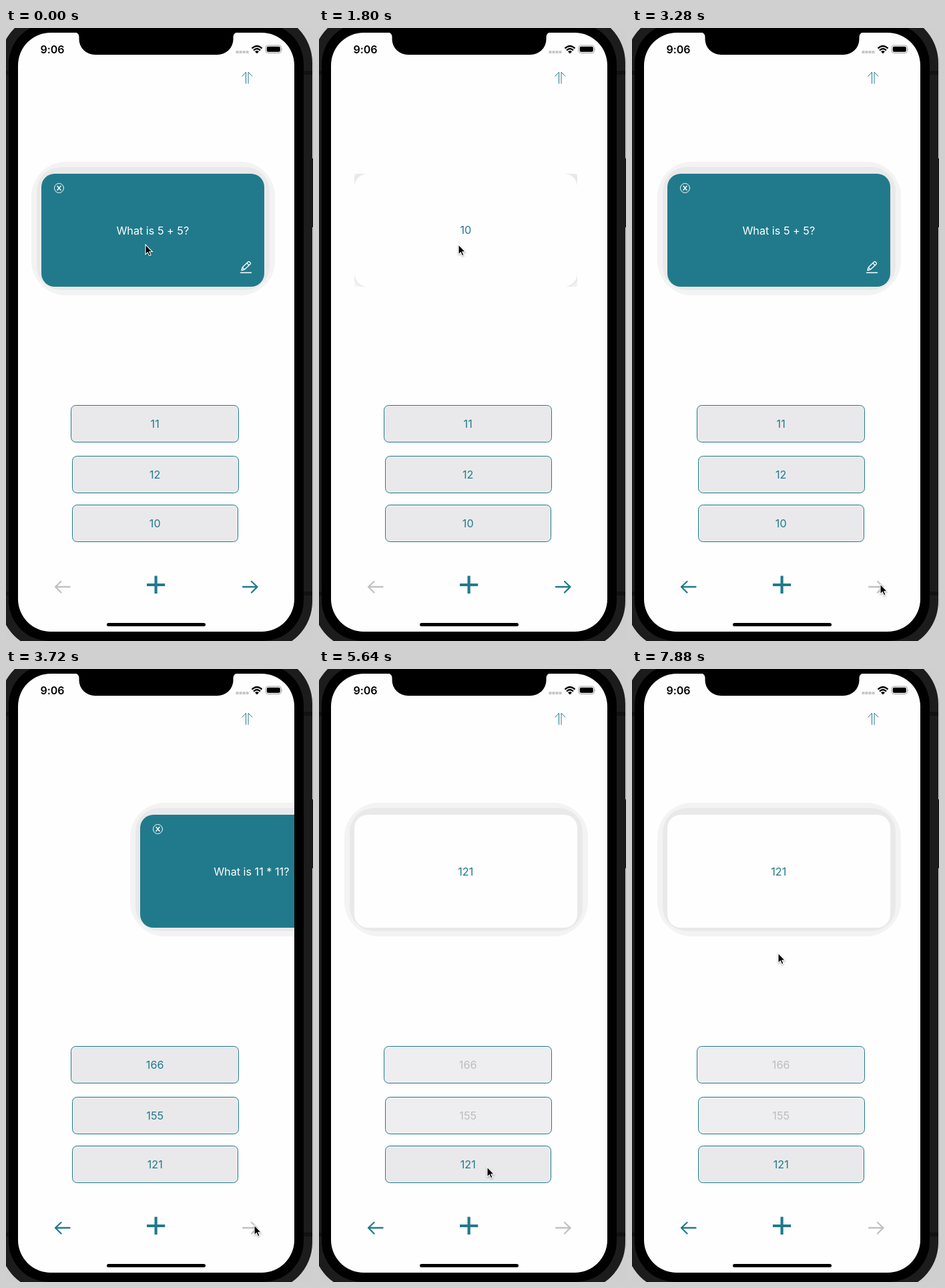
Recreate the animation shown at these times as an HTML page. Size 460x917 px, loop 8000 ms.

```html
<!DOCTYPE html>
<html lang="en">
<head>
<meta charset="utf-8">
<title>Flashcards</title>
<style>
  html, body { margin: 0; width: 100%; height: 100%; overflow: hidden; background: #cfcfcf; }
  #stage { position: fixed; inset: 0; overflow: hidden; contain: strict; }
  #window { position: absolute; left: 18px; top: 0; width: 414px; height: 100%; overflow: hidden; }
  svg { position: absolute; left: 0; top: 0; width: 100%; height: 100%; display: block; }
  #card { left: 35px; top: 218px; width: 334px; height: 169px; overflow: visible; }
  text {
    font-family: Inter, "Liberation Sans", sans-serif;
    font-size: 16.2px; font-feature-settings: "calt" 0; text-anchor: middle;
  }
  .line { fill: none; stroke-linecap: round; stroke-linejoin: round; }
</style>
</head>
<body>
<div id="stage">
<svg viewBox="0 0 460 917">
  <rect width="460" height="917" fill="#cfcfcf"/>
  <rect x="458" y="195" width="2" height="103" fill="#111"/>
  <rect x="-9" y="-20" width="468" height="950" rx="72" fill="#1c1c1c"/>
  <path d="M0 64h4v6h-4zM446 64h13v6h-13zM0 843h4v6h-4zM446 843h13v6h-13z" fill="#121212"/>
  <rect x="4" y="-7" width="442" height="924" rx="61"/>
  <rect x="18" y="7" width="414" height="896" rx="49" fill="#fefefe"/>
  <path d="M103 6.5Q109 7 109.500 13V17A24 23 0 0 0 133.500 40H316.500A24 23 0 0 0 340.500 17V13Q341 7 347 6.500Z"/>

  <text x="69.500" y="37.500" font-weight="600" style="font-size:16px">9:06</text>
  <path d="M344.500 34h4v4h-4zM349.500 34h4v4h-4zM354.500 34h4v4h-4zM359.500 34h4v4h-4z" fill="#c6c6c8"/>
  <path d="M368.500 30.500Q376 23.500 383.500 30.500M371 33.300Q376 28.700 381 33.300" fill="none" stroke="#000" stroke-width="2.300"/>
  <path d="M373 35.300Q376 32.600 379 35.300L376 38.300Z"/>
  <rect x="389" y="26" width="23.500" height="11.500" rx="3.500" fill="none" stroke="#a2a2a2"/>
  <rect x="390.700" y="27.700" width="20.100" height="8.100" rx="2"/>
  <path d="M413.700 30v4q1.600-2 0-4z" fill="#a2a2a2"/>
  <path class="line" d="M359.500 83V66L354 72M363 83V66L368.800 72" stroke="#217a8b"/>

  <g id="answers"></g>
  <path class="line" id="prev" d="M95.500 836H74M82.500 828L74 836L82.500 844.500" stroke-width="2.300"/>
  <path class="line" id="next" d="M355 836H376.500M368 828L376.500 836L368 844.500" stroke-width="2.300"/>
  <path d="M211 833H238.200M224.600 819.500V846" stroke="#217a8b" stroke-width="4.200"/>
  <rect x="151" y="890" width="148" height="5" rx="2.500"/>
</svg>

<div id="window">
  <svg id="card" viewBox="53 218 334 169">
    <rect x="38" y="200" width="365" height="200" rx="52" fill="#f3f3f3"/>
    <rect x="46" y="208" width="349" height="184" rx="36" fill="#e9e9ea"/>
    <rect id="face" x="53" y="218" width="334" height="169" rx="20"/>
    <text id="label" x="219.800" y="308.500"></text>
    <g id="tools" class="line" stroke="#fff">
      <circle cx="79.500" cy="239.500" r="7"/>
      <path d="M77 236.500L82 242.500M82 236.500L77 242.500" stroke-width="1.500"/>
      <path d="M351.500 366H367.500" stroke-width="1.400"/>
      <path d="M353 362.500L354.200 358L362.800 349.800Q364 349 365.200 350.200L366 351Q367 352.200 366 353.300L357.500 361.300ZM361 351.700L364.200 355M354.200 358L357.500 361.300" stroke-width="1.300"/>
    </g>
  </svg>
</div>

<svg viewBox="0 0 460 917">
  <path id="cursor" d="M0 0V14.800L3.300 11.700L5.600 16.800L8.100 15.700L5.900 10.800H10.500Z" stroke="#fff" stroke-width="1.100" style="filter:drop-shadow(0 1px 1px #0005)"/>
</svg>
</div>

<script>
const LOOP = 8000;
const STEP = 148.4;     // time between redraws
const TURN = 300;       // length of each card transition
const SLIDE = 300;      // distance the card travels
const NEXT = 3259, SWAP = NEXT + TURN;
const PRESS = 5190, ANSWER = 5330;
const TEAL = '#217a8b', GREY = '#c1c1c1';

const flips = [430, 1780, ANSWER];

// Each pointer move is a curve bent towards one control point.
const moves = [
  { start: 2200, end: 2900, from: [209, 324], bend: [425, 745], to: [372, 832] },
  { start: 4200, end: 5050, from: [372, 832], bend: [312, 790], to: [252, 745] },
  { start: 7000, end: 7860, from: [252, 745], bend: [310, 590], to: [219, 425] }
];

const $ = id => document.getElementById(id);
const clamp = v => Math.min(1, Math.max(0, v));
const ease = v => { v = clamp(v); return v * v * (3 - 2 * v); };

function put(node, attrs) {
  for (const key in attrs) node.setAttribute(key, attrs[key]);
  return node;
}

function make(tag, attrs) {
  const node = document.createElementNS('http://www.w3.org/2000/svg', tag);
  return $('answers').appendChild(put(node, attrs));
}

const buttons = [[97, 564, 349], [99, 640, 349], [99, 713, 348]].map(([left, top, right]) => ({
  box: make('rect', {
    x: left + .5, y: top + .5, width: right - left - 1, height: 55, rx: 7, stroke: TEAL
  }),
  text: make('text', { x: 223.2, y: top + 33.7 })
}));

function pointer(t) {
  const { start, end, from, bend, to } = moves.findLast(m => t >= m.start) || moves[0];
  const k = ease((t - start) / (end - start));
  return from.map((a, i) => a * (1 - k) ** 2 + 2 * bend[i] * k * (1 - k) + to[i] * k * k);
}

function drawCard(t) {
  const swapped = t >= SWAP;
  const done = flips.filter(start => t >= start);
  const age = t - done.at(-1);
  const flipping = age < TURN;
  const angle = flipping ? 180 * ease(age / TURN) : 0;
  const turned = flipping && angle < 90 ? done.length - 1 : done.length;
  const back = turned % 2 === 1;
  const shift = swapped
    ? SLIDE * (1 - ease((t - SWAP) / TURN))
    : -SLIDE * ease((t - NEXT) / TURN);

  const [question, answer] = swapped ? ['What is 11 * 11?', '121'] : ['What is 5 + 5?', '10'];
  $('label').textContent = back ? answer : question;
  put($('label'), { fill: back ? TEAL : '#fff' });
  put($('face'), { fill: back ? '#fefefe' : TEAL });
  $('tools').style.display = back ? 'none' : '';
  $('card').style.overflow = flipping ? 'hidden' : 'visible';
  $('card').style.transform = flipping
    ? `perspective(2600px) rotateY(${angle < 90 ? -angle : 180 - angle}deg)`
    : `translateX(${Math.trunc(shift)}px)`;
}

function drawButtons(t) {
  const answers = t >= SWAP ? ['166', '155', '121'] : ['11', '12', '10'];
  const answered = t >= ANSWER, pressed = t >= PRESS && !answered;
  buttons.forEach(({ box, text }, i) => {
    const off = answered && i < 2, held = pressed && i === 2;
    text.textContent = answers[i];
    put(text, { fill: off ? '#bdbdbf' : held ? '#5f9ca8' : TEAL });
    put(box, { fill: off || held ? '#eeeef0' : '#e9e9eb' });
  });
  const last = t >= NEXT;
  put($('prev'), { stroke: last ? TEAL : GREY });
  put($('next'), { stroke: last ? GREY : TEAL });
}

function draw(time) {
  const t = Math.floor(time / STEP) * STEP;
  drawCard(t);
  drawButtons(t);
  put($('cursor'), { transform: `translate(${pointer(t)})` });
}

const begin = performance.now();
function tick() {
  draw((performance.now() - begin) % LOOP);
  requestAnimationFrame(tick);
}
tick();
</script>
</body>
</html>
```
